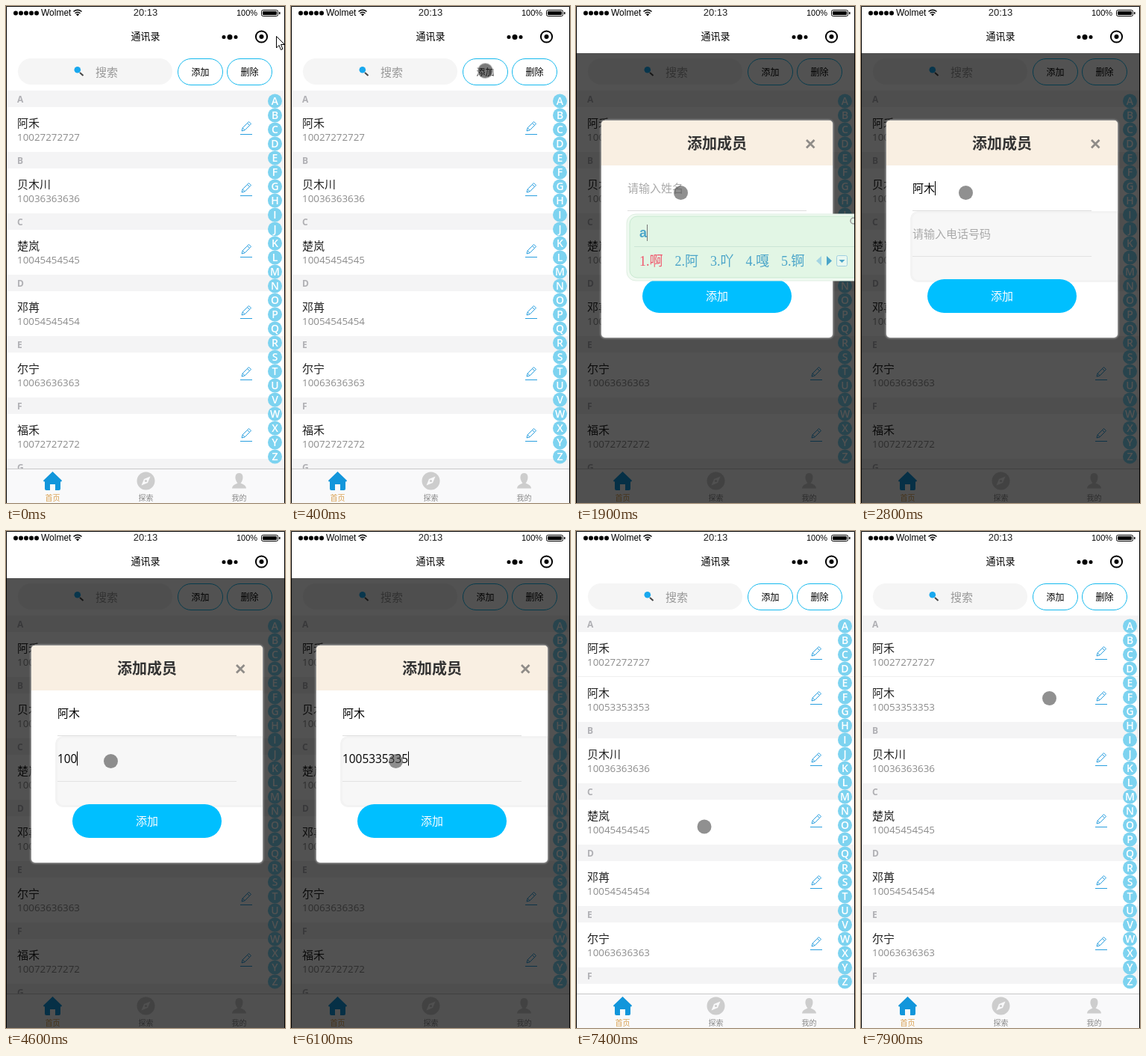
An HTML page for the animation above (8 s loop, 374 by 664 pixels).

```html
<!DOCTYPE html>
<html lang="zh-CN">
<head>
<meta charset="utf-8">
<title>通讯录</title>
<style>
html, body { margin: 0; width: 100%; height: 100%; overflow: hidden; background: #fff; }
svg { display: block; width: 374px; height: 664px; }
text { font-family: "Open Sans", "Noto Sans CJK SC", "Noto Sans CJK", sans-serif; white-space: pre; }
.status { font-family: "Liberation Sans", sans-serif; }
.cand { font: 18px "Liberation Serif", "Noto Sans CJK SC", "Noto Sans CJK", serif; }
</style>
</head>
<body>
<svg id="stage" viewBox="0 0 374 664"></svg>
<script>
const LOOP = 8000;
const BLUE = '#00bfff';
const NEW_NAME = '阿木';
const NEW_PHONE = '10053353353';
const contacts = [
  ['A', '阿禾', '10027272727'],
  ['B', '贝木川', '10036363636'],
  ['C', '楚岚', '10045454545'],
  ['D', '邓苒', '10054545454'],
  ['E', '尔宁', '10063636363'],
  ['F', '福禾', '10072727272'],
  ['G']
];

const rect = (x, y, w, h, fill, extra = '') =>
  `<rect x="${x}" y="${y}" width="${w}" height="${h}" fill="${fill}" ${extra}/>`;
const circle = (x, y, r, fill, extra = '') =>
  `<circle cx="${x}" cy="${y}" r="${r}" fill="${fill}" ${extra}/>`;
const path = (d, fill, stroke = 'none', extra = '') =>
  `<path d="${d}" fill="${fill}" stroke="${stroke}" ${extra}/>`;
const label = (x, y, size, fill, str, extra = '') =>
  `<text x="${x}" y="${y}" font-size="${size}" fill="${fill}" ${extra}>${str}</text>`;
const group = (id, body, extra = '') => `<g id="${id}" ${extra}>${body}</g>`;
const MID = 'text-anchor="middle"';

function statusBar() {
  let s = rect(0, 0, 374, 63, '#fff');
  for (let i = 0; i < 5; i++) s += circle(13 + 7 * i, 9.5, 3, '#000');
  return s
    + label(47, 13, 12, '#000', 'Wolmet', 'class="status"')
    + path('M90.500 7.500Q96 3 101.500 7.500M92.500 9.700Q96 6.700 99.500 9.700', 'none', '#000', 'stroke-width="1.500"')
    + path('M93.800 11Q96 9.300 98.200 11L96 13.500Z', '#000')
    + label(187, 13, 13, '#222', '20:13', `class="status" ${MID}`)
    + label(309, 13, 11, '#000', '100%', 'class="status"')
    + rect(342.5, 5.5, 22, 8, '#fff', 'rx="2" stroke="#000"')
    + rect(344, 7, 19, 5, '#000', 'rx="1"')
    + rect(366, 8, 1.5, 3, '#000')
    + label(187, 45, 13, '#000', '通讯录', MID)
    + circle(292, 41.5, 2.5, '#000') + circle(300, 41.5, 3.5, '#000') + circle(308, 41.5, 2.5, '#000')
    + circle(342.5, 41, 7.6, 'none', 'stroke="#000" stroke-width="2"') + circle(342.5, 41, 3, '#000');
}

function toolbar() {
  const button = (x, str) =>
    rect(x + .5, 70.5, 60, 35, '#fff', `rx="17.5" stroke="#14b9ee"`) + label(x + 30.5, 93, 12, '#000', str, MID);
  return rect(16, 70, 207, 35, '#f5f5f5', 'rx="17.5"')
    + path('M99 89L103.500 93', 'none', '#444', 'stroke-width="2"')
    + circle(95.8, 85.3, 4.3, '#18a8ee')
    + label(120, 94, 15, '#999', '搜索')
    + button(230, '添加') + button(296, '删除');
}

function contactRow(y, name, phone) {
  return label(15, y + 27, 15, '#222', name)
    + label(15, y + 45, 13.35, '#8c8c8c', phone)
    + path(`M316 ${y + 32}l1.200-4.200 8.300-8.300 3 3-8.300 8.300zM323.500 ${y + 21.500}l3 3M317.200 ${y + 27.800}l3 3`, 'none', '#2a9fdf')
    + path(`M314 ${y + 36.500}h16`, 'none', '#2a9fdf');
}

function contactList(withNew) {
  let y = 113, s = '';
  for (const [letter, name, phone] of contacts) {
    s += rect(1, y, 372, 22, '#f4f4f5') + label(15, y + 16, 12, '#b0b0b4', letter, 'font-weight="700"');
    y += 22;
    if (name) s += contactRow(y, name, phone);
    y += 60;
    if (withNew && letter === 'A') {
      s += rect(1, y - 1, 372, 1, '#efefef') + contactRow(y, NEW_NAME, NEW_PHONE);
      y += 60;
    }
  }
  return s;
}

function letterIndex() {
  let s = '';
  for (let i = 0; i < 26; i++) {
    const y = 127 + 19 * i;
    s += circle(360.5, y, 9.5, '#7dd3f0')
      + label(360.5, y + 5, 14, '#fff', String.fromCharCode(65 + i), `${MID} font-weight="600"`);
  }
  return s;
}

function tabBar() {
  return rect(0, 618, 374, 46, '#f9f9fa') + rect(0, 618, 374, 1, '#c8c8c8')
    + path('M62.500 622L75 634Q75 635.500 73 635.500V645Q73 647 71 647H66V639H59V647H54Q52 647 52 645V635.500Q50 635.500 50 634Z', '#1296db')
    + circle(187.5, 634.5, 12, '#cdcdcd')
    + path('M193.500 628.500L190 637L181.500 640.500L185 632Z', '#f9f9fa') + circle(187.5, 634.5, 1.6, '#cdcdcd')
    + path('M312.500 624C307 624 307 630 308 633Q309 636 310.500 637.500Q303 640 303 644.500H322Q322 640 314.500 637.500Q316 636 317 633C318 630 318 624 312.500 624Z', '#cdcdcd')
    + label(62.5, 661, 10, '#d9a050', '首页', MID)
    + label(187.5, 661, 10, '#888', '探索', MID)
    + label(312.5, 661, 10, '#888', '我的', MID);
}

function modal() {
  return rect(1, 63, 372, 601, '#000', 'opacity=".68"')
    + rect(33, 152, 312, 292, '#fff', 'rx="6" opacity=".55" filter="url(#glow)"')
    + rect(34, 153, 310, 290, '#fff', 'rx="5"')
    + path('M34 213V158Q34 153 39 153H339Q344 153 344 158V213Z', '#f9efe2')
    + label(189, 191, 20, '#333', '添加成员', `${MID} font-weight="700"`)
    + path('M309 179L319.500 189.500M319.500 179L309 189.500', 'none', '#8f8c88', 'stroke-width="2.800"')
    + group('residue', rect(67.5, 275.5, 290, 92, '#f7f7f7', 'rx="9" stroke="#f3f3f3" stroke-width="3"'), 'clip-path="url(#card)"')
    + rect(69, 273, 240, 1, '#dedede') + rect(69, 334, 240, 1, '#e2e2e2')
    + label(69, 249, 15, '#aaa', '请输入姓名', 'id="nameHint"')
    + label(69, 249, 15, '#000', NEW_NAME, 'id="nameValue"')
    + label(69, 310, 15, '#aaa', '请输入电话号码', 'id="phoneHint"')
    + label(69, 310, 15.4, '#000', '', 'id="phoneValue"')
    + rect(0, 0, 1, 19, '#000', 'id="caret"')
    + rect(89, 365, 200, 45, BLUE, 'rx="22.5"')
    + label(189, 393, 15, '#fff', '添加', MID);
}

function inputPanel() {
  return rect(68, 278, 330, 89, '#f0faf1', 'rx="12" stroke="#dfeee2"')
    + rect(72, 281, 330, 82, '#e2f6e5', 'rx="10" stroke="#c9e9d1"')
    + label(85, 309, 18, '#4ba5c9', '', 'id="pinyin" class="status" font-weight="700"')
    + rect(0, 292, 1, 22, '#777', 'id="panelCaret"')
    + rect(78, 321, 296, 1, '#cbe6d6')
    + group('candidates', '')
    + path('M329 334V347L322 340.500Z', '#a4d5e3') + path('M336 334V347L343 340.500Z', '#4ba5c9')
    + rect(349.5, 333.5, 14, 14, '#e9f8f0', 'rx="2" stroke="#9fcfe0"') + path('M352.500 339H360.500L356.500 343Z', '#4ba5c9')
    + circle(372, 287, 4, 'none', 'stroke="#999" stroke-width="1.500"');
}

stage.innerHTML = `<defs><filter id="glow"><feGaussianBlur stdDeviation="1.3"/></filter>
  <clipPath id="card">${rect(34, 213, 310, 230, '#000')}</clipPath></defs>`
  + rect(0, 0, 374, 664, '#fff') + toolbar()
  + group('before', contactList(false))
  + group('after', contactList(true))
  + letterIndex() + tabBar() + group('modalLayer', modal()) + statusBar()
  + group('panel', inputPanel())
  + group('arrow', path('M362.500 40.500V56L366 52.500L368.500 58.500L371 57.500L368.500 51.500H373.500Z', '#fff', '#000'))
  + circle(0, 0, 9.5, '#464646', 'id="touch"')
  + path('M.5 664V.5H373.500V664', 'none', '#000');

// [time, x, y, pressed]
const touchSteps = [
  [100, 243.5, 74.5], [300, 257, 84], [400, 260.5, 86.5, 1], [700, 260.5, 86.5], [800, 225, 136],
  [900, 165, 215], [1000, 138, 254], [1200, 140.5, 249.5], [1300, 140.5, 249.5, 1], [1400, 140.5, 249.5],
  [3100, 140.5, 240.5], [3300, 147, 262], [3400, 145, 290], [3500, 140.5, 307.5],
  [3600, 140.5, 307.5, 1], [3700, 140.5, 307.5], [6900, 145, 359], [7000, 158, 377],
  [7100, 167.5, 388.5], [7200, 167.5, 388.5, 1], [7400, 172, 395],
  [7700, 192, 352], [7800, 236, 250], [7900, 252.5, 223.5]
];
const digitTimes = [4200, 4500, 4600, 4900, 5100, 5200, 5500, 5700, 5900, 6100, 6200];
const typing = [
  [1900, 'a', '啊 阿 吖 嘎 锕'],
  [2200, "a'm", '阿妹 阿木 阿满'],
  [2400, "a'mu", '阿木 阿姆 阿牧']
];

const el = id => document.getElementById(id);
const show = (id, on) => el(id).setAttribute('display', on ? 'inline' : 'none');
const set = (id, attrs) => { for (const k in attrs) el(id).setAttribute(k, attrs[k]); };
const current = (steps, t) => steps.filter(s => s[0] <= t).pop();

function drawTouch(t) {
  const step = current(touchSteps, t);
  show('arrow', !step);
  show('touch', step);
  if (!step) return;
  const [, x, y, pressed] = step;
  set('touch', pressed
    ? { cx: x, cy: y, r: 10.5, fill: '#222', 'fill-opacity': .6, stroke: '#fff', 'stroke-opacity': .5, 'stroke-width': 2 }
    : { cx: x, cy: y, r: 9.5, fill: '#464646', 'fill-opacity': .6, stroke: 'none' });
}

function drawPanel(t) {
  const open = t >= 1900 && t < 2800;
  show('panel', open);
  if (!open) return;
  const [, keys, words] = current(typing, t);
  if (el('pinyin').textContent === keys) return;
  el('pinyin').textContent = keys;
  set('panelCaret', { x: 85 + Math.round(el('pinyin').getComputedTextLength()) });
  let x = 85;
  el('candidates').innerHTML = words.split(' ').map((word, i) => {
    const s = `<text class="cand" x="${x}" y="347" fill="${i ? '#4ba5c9' : '#f0566c'}">${i + 1}.${word}</text>`;
    x += 29.5 + 18 * word.length;
    return s;
  }).join('');
}

function drawForm(t) {
  const open = t >= 600 && t < 7400;
  show('modalLayer', open);
  show('before', t < 7400);
  show('after', t >= 7400);
  if (!open) return;
  const named = t >= 2800;
  const digits = digitTimes.filter(d => d <= t).length;
  show('nameHint', !named);
  show('nameValue', named);
  show('residue', named);
  show('phoneHint', !digits);
  el('phoneValue').textContent = NEW_PHONE.slice(0, digits);
  const onPhone = t >= 3700;
  show('caret', onPhone ? t < 6700 || t >= 6900 : named || (t >= 1400 && t < 1900));
  set('caret', onPhone
    ? { x: Math.round(69 + 8.8 * digits), y: 294.5 }
    : { x: named ? 99 : 69, y: 234 });
}

function frame() {
  const t = Math.floor((performance.now() % LOOP) / 100) * 100;
  drawForm(t);
  drawPanel(t);
  drawTouch(t);
  requestAnimationFrame(frame);
}
frame();
</script>
</body>
</html>
```
